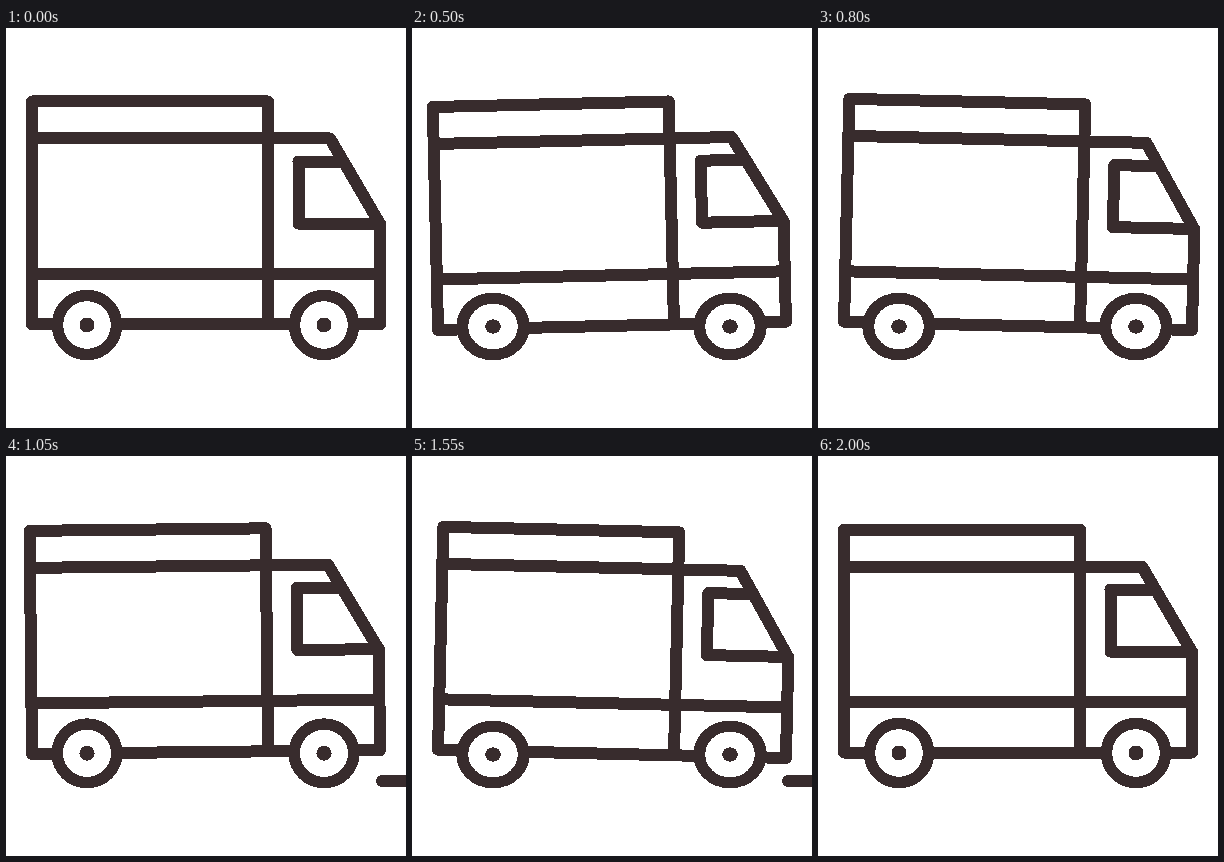
These frames come from a looping animation (400x400 px, 2020 ms). An HTML page without scripts:

```html
<!DOCTYPE html>
<html lang="en">
<head>
<meta charset="utf-8">
<title>Delivery truck</title>
<style>
  /* clock in ms; every pose below is a formula of it */
  @property --t { syntax: "<number>"; inherits: true; initial-value: 0; }
  @keyframes clock {
    from { --t: 0; }
    to { --t: 2020; }
  }

  html, body { margin: 0; width: 100%; height: 100%; overflow: hidden; background: #fff; }
  svg {
    display: block; width: 100vw; height: 100vh;
    animation: clock 2020ms linear infinite;
    /* swing of 700 ms period, faded in and out over 125 ms */
    --wave: cos((var(--t) - 125) * 360deg / 700);
    --fade: clamp(0, min(var(--t), 2000 - var(--t)) / 125, 1);
    --press: (var(--wave) * var(--wave) * var(--fade));
  }
  .ink {
    fill: none; stroke: #382c2d; stroke-width: 12;
    stroke-linecap: round; stroke-linejoin: round; shape-rendering: crispEdges;
  }
  .body {
    transform-origin: 200px 297px;
    transform:
      translateY(calc((2.5 * var(--press) - var(--fade)) * 1px))
      rotate(calc(1.38deg * var(--wave) * var(--fade)));
  }
  .wheel { transform: scale(calc(1 + .045 * var(--press)), calc(1 - .045 * var(--press))); }
  .rear { transform-origin: 81px 332px; }
  .front { transform-origin: 318px 332px; }
  .tyre { fill: #fff; stroke-width: 11.5; }
  .hub { fill: #382c2d; stroke: none; }
  .road {
    stroke-dasharray: 80 920;
    stroke-dashoffset: calc((2 * min(var(--t), 2000) - 528) * 1px);
  }
</style>
</head>
<body>
<svg viewBox="0 0 400 400" class="ink">
  <path class="road" d="M-50 325H500"/>
  <g class="body">
    <path d="M262 296.5V73.5H26V296.5H374V196L324 110.5H26M26 246H374"/>
    <path d="M337 133.5H292.5V195.5H374"/>
  </g>
  <g class="wheel rear">
    <circle class="tyre" cx="81" cy="297" r="29.5"/>
    <circle class="hub" cx="81" cy="297" r="7.5"/>
  </g>
  <g class="wheel front">
    <circle class="tyre" cx="318" cy="297" r="29.5"/>
    <circle class="hub" cx="318" cy="297" r="7.5"/>
  </g>
</svg>
</body>
</html>
```
